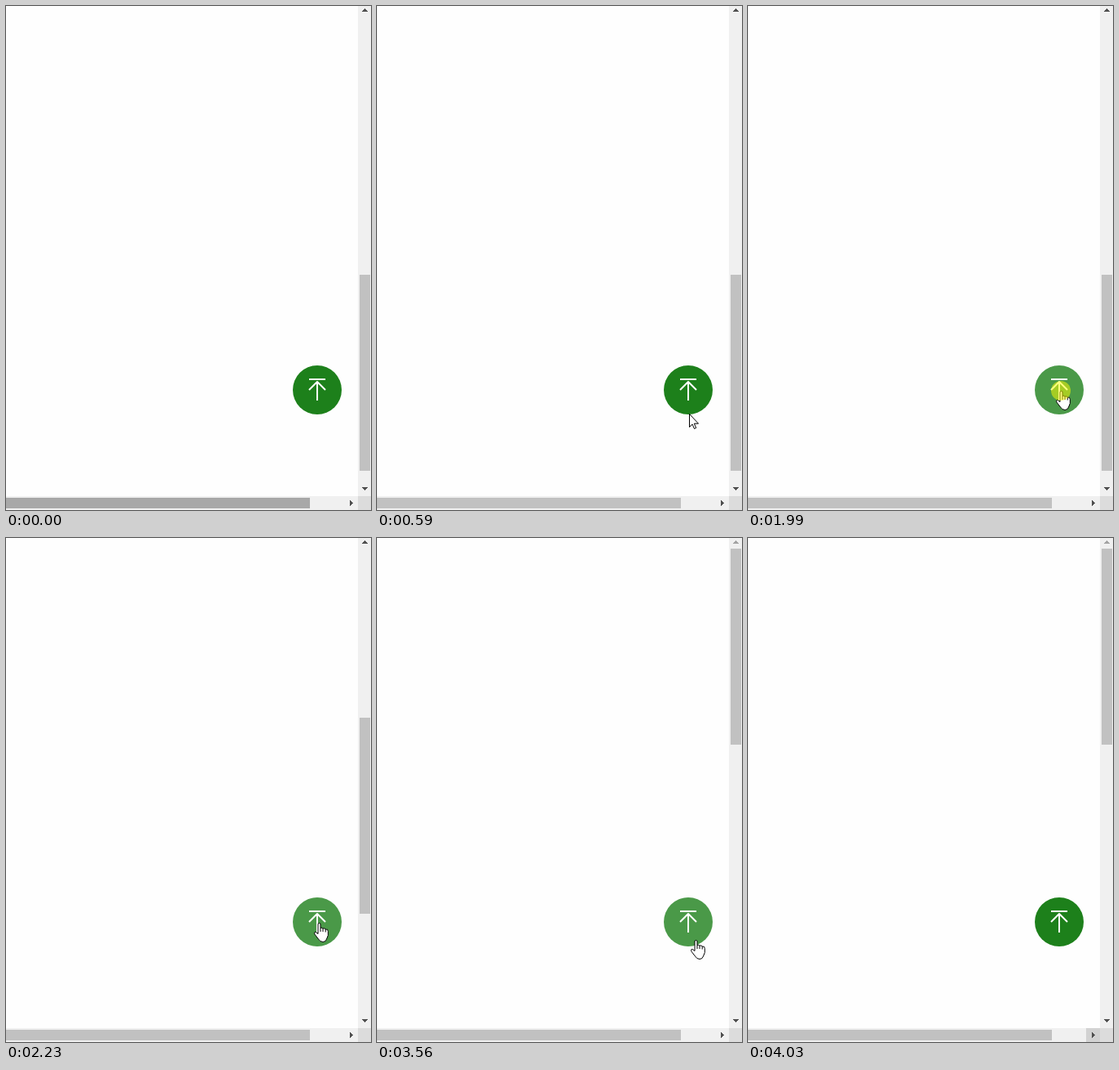
Write an HTML page that moves like this. It is 448 by 617 pixels and loops after 6050 ms.

```html
<!DOCTYPE html>
<html lang="en">
<head>
<meta charset="utf-8">
<title>Back to top</title>
<style>
html, body { margin: 0; height: 100%; overflow: hidden; background: #fefefe; }
svg { display: block; }
</style>
</head>
<body>
<svg width="448" height="617" viewBox="0 0 448 617">
  <circle id="button" cx="382" cy="470" r="30" fill="#1d801b"/>
  <path d="M372 457h20M382 483V460M372 470l10-10 10 10" fill="none" stroke="#fff" stroke-width="2" stroke-linejoin="round"/>

  <path d="M432 0h16v600h-16zM0 600h432v17H0z" fill="#f0f0f0"/>
  <path d="M432 600h16v17h-16z" fill="#dcdcdc"/>
  <rect id="vThumb" x="434" width="13" height="240" fill="#c1c1c1"/>
  <rect id="hThumb" y="602" width="373" height="13"/>
  <rect id="rightKey" x="415" y="600" width="17" height="17" fill="#d2d2d2"/>
  <g shape-rendering="crispEdges" fill="#505050">
    <path id="upArrow" d="M436.3 7h8.4l-4.2-4.2z"/>
    <path d="M436.3 589h8.4l-4.2 4.2zM422 604.3v8.4l4.2-4.2z"/>
  </g>

  <g id="cursor" fill="#fff" stroke="#000" stroke-linejoin="round">
    <path id="arrow" d="M.5.5V16.5L4 13L6.5 18.5L8.7 17.5L6.3 12.2H11.5Z"/>
    <g id="hand">
      <path d="M-1 13.5V2Q-1 .5 .5 .5T2 2V6.5Q4 5.5 5 7.2Q7.2 6 8.2 8Q11.3 7.3 11.3 10.5V15.5L9.5 20Q8.5 23.5 5 23.5T-.5 20L-4.8 14.5Q-6 12.5-5 11.5Q-3.5 11-1 13.5Z"/>
      <path d="M2 6.5V11M5 7V11M8.2 8V11.5" fill="none"/>
    </g>
  </g>
  <circle id="click" cx="384" cy="471" r="12" fill="#ff0" opacity=".5"/>
</svg>
<script>
const LOOP = 6050;
const $ = id => document.getElementById(id);
const show = (id, on) => $(id).setAttribute('visibility', on ? 'visible' : 'hidden');
const fill = (id, colour) => $(id).setAttribute('fill', colour);
const mix = (a, b, p) => a + (b - a) * p;

// Progress 0..1 in visible steps, the first one taken at the start time
function progress(t, start, stepMs, steps) {
  const step = Math.floor((t - start) / stepMs) + 1;
  return Math.min(Math.max(step, 0), steps) / steps;
}

function draw(now) {
  const t = now % LOOP;

  // The pointer slows down onto the button, later leaves for the scroll bar key
  const arrive = 1 - (1 - progress(t, 365, 75, 8)) ** 2;
  const leave = progress(t, 3560, 78, 6);
  const x = Math.round(mix(mix(380, 384, arrive), 423, leave));
  const y = Math.floor(mix(mix(585, 471, arrive), 598, leave));
  const visible = t >= 290 && t < 4030;
  const hover = visible && Math.hypot(x - 382, y - 470) < 28;

  const scrolled = (1 - Math.cos(Math.PI * progress(t, 2140, 82.5, 5))) / 2;

  $('button').setAttribute('opacity', hover ? 0.8 : 1);
  $('cursor').setAttribute('transform', `translate(${x} ${y})`);
  show('arrow', visible && !hover);
  show('hand', hover);
  show('click', t >= 1990 && t < 2140);
  show('rightKey', t >= 3950);
  fill('hThumb', t < 290 ? '#a8a8a8' : '#c1c1c1');
  fill('upArrow', scrolled < 1 ? '#505050' : '#a3a3a3');
  $('vThumb').setAttribute('y', Math.round(mix(329, 13, scrolled)));
}

const start = performance.now();
function tick() {
  draw(performance.now() - start);
  requestAnimationFrame(tick);
}
tick();
</script>
</body>
</html>
```
